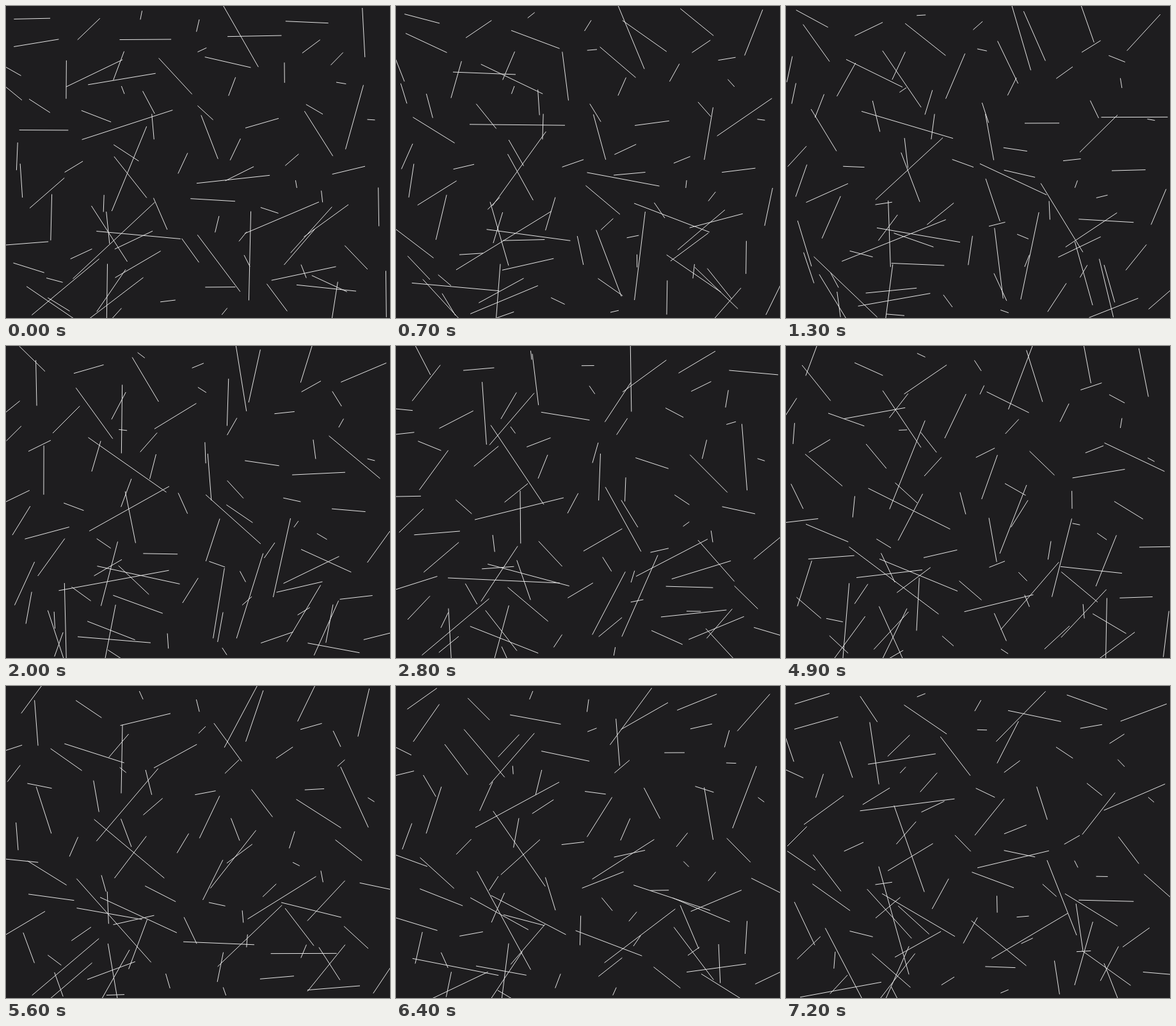
Write an HTML page with a canvas that moves like this. It is 600 by 487 pixels and loops after 7.3 s.

```html
<!DOCTYPE html>
<html lang="en">
<head>
<meta charset="utf-8">
<title>Turning needles</title>
<style>
  html, body { margin: 0; height: 100%; overflow: hidden; background: #1e1d1f; }
  canvas { display: block; }
</style>
</head>
<body>
<canvas id="stage" width="600" height="487"></canvas>
<script>
const LOOP = 7300, STEP = 100;
const stage = document.getElementById('stage');
const { width, height } = stage;
const ctx = stage.getContext('2d');

// Long needles: centre x, centre y, half length, start angle (deg), speed (deg/s)
const needles = [
  [189, 185, 74.5, -18, 26.5],  [180.5, 113.5, 53.5, -9.5, 50.1],
  [137.5, 104.5, 49, -25.7, 39.9], [192, 253.5, 71.5, 112.4, 19.2],
  [206.5, 357, 66, 5.2, 3.5],   [168, 365.5, 87.5, -43, 16.3],
  [92.5, 438, 68.5, 140.2, 64.2], [354.5, 270, 57.5, -6.2, 24],
  [332, 401, 55.5, 53, 23.1],   [380.5, 389.5, 69.5, 91.3, 8.05],
  [430.5, 330, 63, -23, 62.7],  [366.5, 47, 55, 60.2, 10.33],
  [544, 173, 52, 105.6, 57.1],  [476.5, 349, 48.3, 132, 11.05],
  [464.7, 417, 51.5, -12, 66.4], [500, 439.7, 46.8, 6, 54.1],
  [157, 474, 72, 90.8, 5.13],   [168.5, 458, 57.2, 142.7, 21],
  [85, 473.5, 64.5, 34.2, 18.8], [161, 355, 51.8, 57.2, 23.7],
];

// Shorter needles, spread evenly with seeded lengths and speeds
let seed = 11;
const random = (low, high) => {
  seed = seed * 16807 % 2147483647;
  return low + (high - low) * seed / 2147483647;
};
for (let i = 1; i <= 77; i++) {
  needles.push([
    width * (i * 0.7548777 % 1), height * (i * 0.5698403 % 1),
    random(6, 43), random(0, 180), random(3, 66),
  ]);
}

function draw(now) {
  const seconds = Math.floor(now % LOOP / STEP) * STEP / 1000;
  ctx.fillStyle = '#1e1d1f';
  ctx.fillRect(0, 0, width, height);
  ctx.strokeStyle = '#e6e6e6';
  ctx.beginPath();
  for (const [x, y, half, start, speed] of needles) {
    const angle = (start + speed * seconds) * Math.PI / 180;
    const dx = half * Math.cos(angle), dy = half * Math.sin(angle);
    ctx.moveTo(x - dx + 0.5, y - dy + 0.5);
    ctx.lineTo(x + dx + 0.5, y + dy + 0.5);
  }
  ctx.stroke();
}

const begin = performance.now();
(function tick() {
  draw(performance.now() - begin);
  requestAnimationFrame(tick);
})();
</script>
</body>
</html>
```
